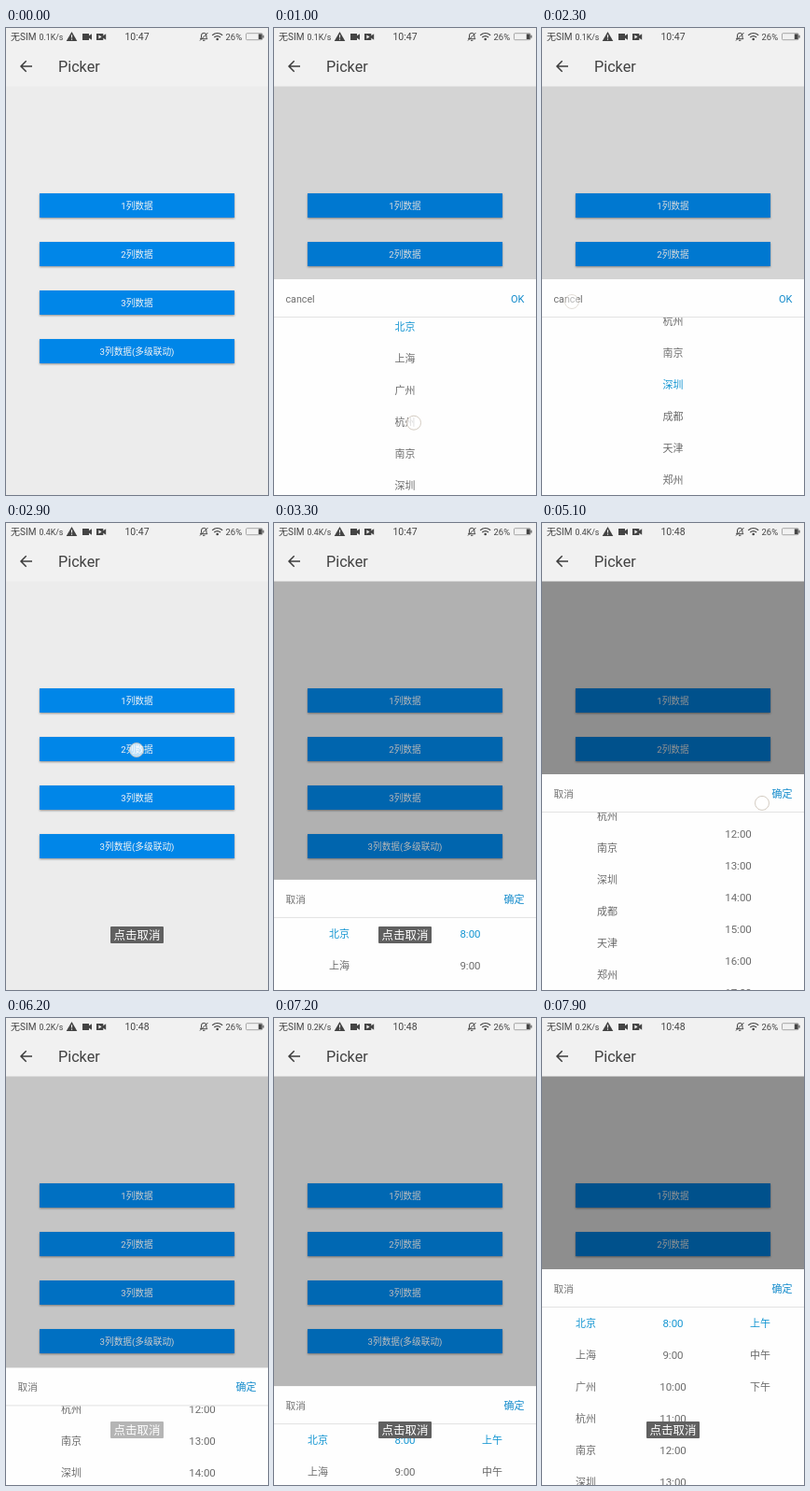
These frames come from a looping animation (281x500 px, 8 s). An HTML page:

```html
<!DOCTYPE html>
<html lang="zh">
<head>
<meta charset="utf-8">
<title>Picker</title>
<style>
html, body { margin: 0; width: 100%; height: 100%; overflow: hidden; background: #ececec; }
svg { display: block; width: 100vw; height: 100vh; }
text { font-family: Roboto, "Noto Sans CJK SC", "Noto Sans CJK", sans-serif; }
</style>
</head>
<body>
<svg id="stage" viewBox="0 0 281 500" preserveAspectRatio="none">
  <defs>
    <clipPath id="listClip"><rect x="0" y="310" width="281" height="191"/></clipPath>
    <filter id="shadow" x="-5%" y="-20%" width="110%" height="150%">
      <feDropShadow dx="0" dy="1" stdDeviation=".8" flood-color="#000" flood-opacity=".4"/>
    </filter>
  </defs>
  <rect width="281" height="500" fill="#ececec"/>
  <g id="buttons"></g>
  <rect id="mask" y="62" width="281" height="438"/>

  <rect width="281" height="62.5" fill="#f1f1f1"/>
  <g fill="#444">
    <text x="5" y="13" font-size="10">无SIM</text>
    <text id="speed" x="35.5" y="13" font-size="8.8"></text>
    <text id="clock" x="140.5" y="13.2" font-size="10.5" text-anchor="middle"></text>
    <text x="235.5" y="13" font-size="9.5">26%</text>
    <path d="M70.5 4L76.3 14H64.7Z"/>
    <path d="M70.5 7.3V10.4M70.5 11.5V12.7" stroke="#f1f1f1" stroke-width="1.1"/>
    <path d="M82 6h7v2.3l3-2v6.4l-3-2V13h-7Z"/>
    <path d="M97 6h7.3v2.3l2.9-2v6.4l-2.9-2V13H97Z"/>
    <path d="M99.4 7.6L102.6 9.5L99.4 11.4Z" fill="#f1f1f1"/>
    <g fill="none" stroke="#444">
      <path d="M208.5 11.7h7.4l-1-1.6V8a2.7 2.7 0 0 0-5.4 0v2.1ZM211 13.3h2.4M208 13.5L216.5 5"/>
      <path d="M221.2 7.8q5.5-4.6 11 0M223.3 10q3.4-2.8 6.8 0" stroke-width="1.2"/>
      <rect x="257.5" y="5.7" width="17.5" height="7" rx="1" stroke="#888" stroke-width=".7"/>
    </g>
    <circle cx="226.7" cy="12" r="1.3"/>
    <rect x="270.8" y="6.4" width="3.8" height="5.6"/>
    <rect x="275.4" y="7.8" width="1.1" height="2.8"/>
  </g>
  <path d="M28 41H16.5M21.7 35.2L16 41L21.7 46.8" fill="none" stroke="#3d3d3d" stroke-width="1.5"/>
  <text x="56" y="47" font-size="16.2" fill="#424242">Picker</text>

  <g id="sheet">
    <rect y="269" width="281" height="240" fill="#fefefe"/>
    <text id="cancel" x="12.5" y="294" font-size="10.7" fill="#707070"></text>
    <text id="ok" x="268.5" y="294" font-size="11" fill="#128acb" text-anchor="end"></text>
    <rect y="309" width="281" height="1" fill="#e2e2e2"/>
    <g id="list" clip-path="url(#listClip)"></g>
  </g>
  <g id="toast">
    <rect x="112" y="432" width="57" height="18" rx="1" fill="#606060"/>
    <text x="140.5" y="445.5" font-size="12.5" font-weight="300" fill="#fff" text-anchor="middle">点击取消</text>
  </g>
  <circle id="touch" r="7.5" fill="#fff" fill-opacity=".75" stroke="#cfc6ba" stroke-width=".9"/>
</svg>
<script>
const LOOP = 8000, ROW = 34, OPEN = 300, TRAVEL = 232;
const $ = id => document.getElementById(id);
const clamp = v => Math.max(0, Math.min(1, v));
const ramp = (t, from, len) => clamp((t - from) / len);
const inOut = p => p < .5 ? 2 * p * p : 1 - 2 * (1 - p) * (1 - p);
const out = p => 1 - (1 - p) * (1 - p);

function add(parent, tag, attrs, text) {
  const el = document.createElementNS('http://www.w3.org/2000/svg', tag);
  for (const k in attrs) el.setAttribute(k, attrs[k]);
  if (text) el.textContent = text;
  return parent.appendChild(el);
}

['1列数据', '2列数据', '3列数据', '3列数据(多级联动)'].forEach((label, i) => {
  const y = 177 + i * 52;
  add($('buttons'), 'rect', { x: 36, y, width: 209, height: 26, fill: '#0586e8', filter: 'url(#shadow)' });
  add($('buttons'), 'text', { x: 140.5, y: y + 17, 'font-size': 9.7, fill: '#f4f4f4', 'text-anchor': 'middle' }, label);
});

const cities = '北京 上海 广州 杭州 南京 深圳 成都 天津 郑州'.split(' ');
const hours = Array.from({ length: 10 }, (_, i) => i + 8 + ':00');
const parts = ['上午', '中午', '下午'];

const pickers = [
  { start: 420, end: 2305, dim: .1, labels: ['cancel', 'OK'], cols: [[140.5, cities]] },
  { start: 3149, end: 6058, dim: .4, labels: ['取消', '确定'], cols: [[70, cities], [210.5, hours]] },
  { start: 7057, end: 9000, dim: .4, labels: ['取消', '确定'], cols: [[47, cities], [140.5, hours], [234, parts]] }
];

for (const p of pickers) {
  p.group = add($('list'), 'g', {});
  p.views = p.cols.map(([x, items]) => {
    const view = add(p.group, 'g', {});
    view.rows = items.map((s, i) => add(view, 'text', {
      x, y: 331 + i * ROW, 'font-size': s.includes(':') ? 11.5 : 11, 'text-anchor': 'middle'
    }, s));
    return view;
  });
}

function scrolls(t) {
  return [
    [115 * out(ramp(t, 980, 650))],
    [115 * out(ramp(t, 3750, 650)), 149 * out(ramp(t, 4550, 856))],
    [0, 0, 0]
  ];
}

// [from, to, x, y, drag distance]
function touchAt(t, s) {
  const taps = [
    [80, 380, 140, 191, 0],
    [980, 1400, 150, 430, s[0][0]],
    [1700, 1900, 140, 382, 0],
    [2250, 2380, 32, 293, 0],
    [2880, 3190, 140, 243, 0],
    [3750, 4200, 80, 430, s[1][0]],
    [4550, 5230, 236, 430, s[1][1]],
    [5850, 6080, 30, 287, 0],
    [6800, 7080, 140, 295, 0]
  ];
  return taps.find(a => t >= a[0] && t < a[1]);
}

function draw(t) {
  const s = scrolls(t);
  let shown = 0, dim = 0;
  pickers.forEach((p, i) => {
    const active = t >= p.start && t < p.end + OPEN;
    p.group.setAttribute('display', active ? 'inline' : 'none');
    if (!active) return;
    const rise = inOut(ramp(t, p.start, OPEN)), fall = inOut(ramp(t, p.end, OPEN));
    shown = rise - fall;
    dim = p.dim * (clamp(rise * 1.23) - clamp(fall * 1.29));
    $('cancel').textContent = p.labels[0];
    $('ok').textContent = p.labels[1];
    const picked = i === 0 && t >= 1780 ? 5 : 0;
    p.views.forEach((view, c) => {
      view.setAttribute('transform', `translate(0 ${-s[i][c]})`);
      view.rows.forEach((row, n) => row.setAttribute('fill', n === picked ? '#1596d2' : '#6c6c6c'));
    });
  });
  $('sheet').setAttribute('transform', `translate(0 ${TRAVEL * (1 - shown)})`);
  $('mask').setAttribute('opacity', dim);

  const toast = t < 6000
    ? ramp(t, 2390, 220) - ramp(t, 4400, 250)
    : ramp(t, 6100, 220);
  $('toast').setAttribute('opacity', toast);

  const hit = touchAt(t, s);
  $('touch').setAttribute('display', hit ? 'inline' : 'none');
  if (hit) {
    $('touch').setAttribute('cx', hit[2]);
    $('touch').setAttribute('cy', hit[3] - hit[4]);
    $('touch').setAttribute('opacity', clamp((hit[1] - t) / 120));
  }
  $('speed').textContent = t < 2500 ? '0.1K/s' : t < 5900 ? '0.4K/s' : '0.2K/s';
  $('clock').textContent = t < 4100 ? '10:47' : '10:48';
}

const begin = performance.now();
function tick() {
  draw((performance.now() - begin) % LOOP);
  requestAnimationFrame(tick);
}
tick();
</script>
</body>
</html>
```
